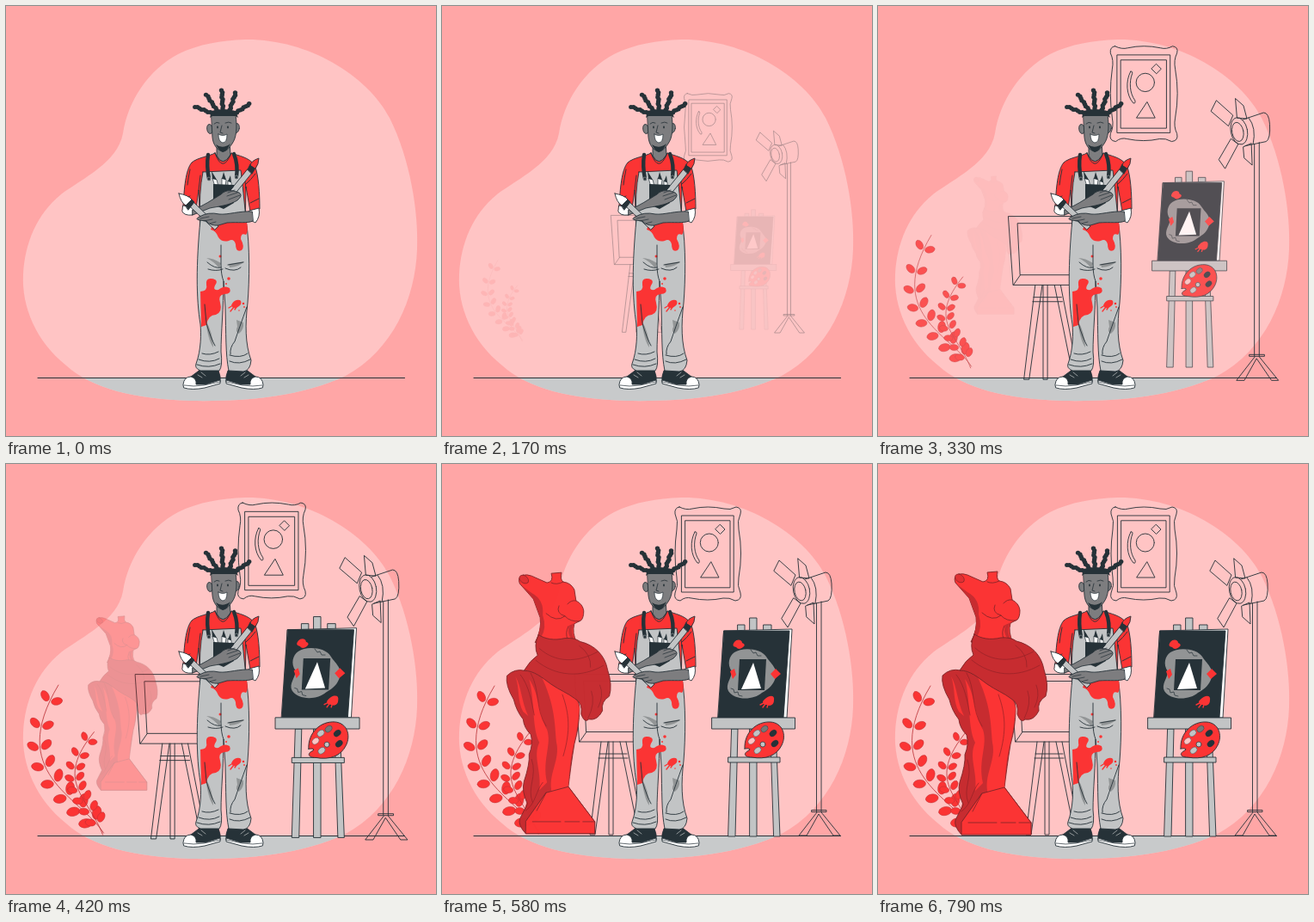
An HTML page with a canvas that plays this animation: 500 by 500 pixels, repeating every 830 ms.

```html
<!DOCTYPE html>
<html lang="en">
<head>
<meta charset="utf-8">
<title>Artist in the studio</title>
<style>
html, body { margin: 0; width: 100%; height: 100%; overflow: hidden; background: #ffa6a6; }
canvas { display: block; width: 100vw; height: 100vh; }
</style>
</head>
<body>
<canvas id="stage"></canvas>
<script>
const SIZE = 500, LOOP = 830, STEPS = 20, ZOOM_STEPS = 11;
const INK = '#263238', RED = '#fb3434', DEEP = '#c72c30', GREY = '#c2c4c5', SKIN = '#7d7d7f', WHITE = '#fff';
const ratio = Math.max(1, window.devicePixelRatio || 1);

function makeCanvas(canvas) {
  canvas.width = canvas.height = SIZE * ratio;
  const context = canvas.getContext('2d');
  context.lineCap = context.lineJoin = 'round';
  return context;
}

const stage = makeCanvas(document.getElementById('stage'));
const layer = makeCanvas(document.createElement('canvas'));
let ctx = stage;

function shape(d, fill, stroke = INK, width = 0.9) {
  const path = new Path2D(d);
  if (fill) { ctx.fillStyle = fill; ctx.fill(path); }
  if (stroke) { ctx.strokeStyle = stroke; ctx.lineWidth = width; ctx.stroke(path); }
}
const line = (d, width, color) => shape(d, null, color, width);
const flat = (d, fill) => shape(d, fill, null);

function oval(x, y, rx, ry, turn, fill, stroke, width = 0.9) {
  ctx.beginPath();
  ctx.ellipse(x, y, rx, ry, turn, 0, Math.PI * 2);
  if (fill) { ctx.fillStyle = fill; ctx.fill(); }
  if (stroke) { ctx.strokeStyle = stroke; ctx.lineWidth = width; ctx.stroke(); }
}

// Easing curve (.36, -.01, .5, 1.38): a quick rise with a small overshoot.
function ease(x) {
  if (x <= 0) return 0;
  if (x >= 1) return 1;
  const curve = (s, a, b) => 3 * s * (1 - s) ** 2 * a + 3 * s * s * (1 - s) * b + s ** 3;
  let low = 0, high = 1;
  for (let i = 0; i < 30; i++) {
    const mid = (low + high) / 2;
    if (curve(mid, 0.36, 0.5) < x) low = mid; else high = mid;
  }
  return curve(low, -0.01, 1.38);
}

function drawBackdrop() {
  ctx.fillStyle = '#ffa6a6';
  ctx.fillRect(0, 0, SIZE, SIZE);
  const blob = 'M278 39C350 38 420 80 446 130C470 178 480 240 478 283C476 340 450 400 395 430' +
    'C340 456 270 460 215 459C150 457 100 445 70 418C35 390 18 350 20 312C22 275 36 242 64 219' +
    'C88 201 130 182 136 148C142 110 165 75 200 56C225 44 250 40 278 39Z';
  flat(blob, '#ffc4c4');
  ctx.save();
  ctx.clip(new Path2D(blob));
  ctx.fillStyle = '#c8cacb';
  ctx.fillRect(0, 432, SIZE, 68);
  ctx.restore();
  line('M37 432.5H463.5', 1.1);
}

function drawPicture() {
  line('M276 50Q284 54 291 52Q309 48 328 52Q335 54 342 50Q349 51 347 58Q343 66 345 76Q350 104 345 132' +
    'Q343 142 347 150Q349 158 341 159Q334 155 327 156Q309 160 290 156Q283 154 277 159Q269 158 271 150' +
    'Q275 142 273 132Q269 104 273 76Q275 66 271 58Q270 51 276 50Z');
  line('M278.8 60H339.2V149H278.8ZM283 65.8H335V143.8H283Z');
  line('M294 79C288 90 289 106 297 115Q300 116 299 112C293 104 292 91 296 81Q296 78 294 79Z');
  oval(310.8, 91.5, 10.5, 10.5, 0, null, INK);
  line('M323.5 70.5L329 76L323.5 81.5L318 76ZM313 114L322 132H301Z');
}

function drawStand() {
  line('M154.5 244.5H260V323H160ZM165 252.5H260V311.5H168ZM160 323L168 311.5');
  line('M185 323L172 431H178L193 323M194 323V431H199V323M207 323L229 431H235L214 323');
  line('M183 337H215M182 342H216');
}

function drawLamp() {
  line('M435.5 162V404M441 160V404M430 404.5H447V402.5H430Z');
  line('M436 405L415 432H424L438 407L455 432H463L441 405');
  line('M422 134L446 126Q452 126 453 139Q454 156 449 159L425 164');
  line('M429 132Q438 143 434 162');
  oval(418, 147, 9.5, 15.5, -0.2, null, INK);
  oval(416.5, 148, 6.5, 11, -0.2, null, INK);
  line('M386 124L392 112L411 129L406 141ZM414 110L423 118L427 133L416 132ZM409 156L417 162L402 190L395 180ZM423 165L432 161L433 186L424 178Z');
}

function drawEasel() {
  shape('M344 187H352V195H344ZM358 179H366V196H358ZM374 187H383V195H374Z', GREY);
  shape('M337 308H344L341 433H333ZM358 308H366V433H358ZM382 308H388L393 433H386Z', GREY);
  shape('M328 194L407 192L401 295H322Z', WHITE);
  shape('M328 194H404L397 295H321Z', INK);
  flat('M340 219C350 212 372 215 377 224C382 232 391 238 388 248C385 257 381 261 372 266C362 275 340 275 333 264C329 256 337 249 337 241C331 233 334 223 340 219Z', '#929495');
  line('M359 216l3 4 3-1 2 4 4 0M336 261l3 1 1 4 4-1 1 4 4 1', 0.7);
  flat('M346 227H377L375 263H344Z', INK);
  flat('M362 231L371 261L348 262Z', WHITE);
  flat('M340 207C343 203 349 204 349 208Q354 210 350 213Q345 217 342 213Q336 212 340 207ZM335 241L340 238L342 245L338 250ZM388 238L394 244L387 250L382 244Z', RED);
  flat('M373 276Q377 271 381 270Q387 269 386 275Q386 280 381 281L377 280Q373 280 373 276Z', RED);
  line('M374 278L370 280M376 279L373 283M379 280L378 283', 1.4, RED);
  shape('M314 295H410.5V308H314Z', GREY);
  shape('M333 341H393V347H333Z', GREY);
  shape('M352 331C351 312 366 299 382 300C396 301 401 315 395 327C389 339 377 344 360 341C351 341 350 336 357 333Q360 330 352 331Z', RED);
  oval(373, 326, 3, 3, 0, GREY, INK, 0.7);
  for (const [x, y, color] of [[360, 322, '#ffc4c4'], [366, 313, GREY], [375, 308, '#777'], [385, 313, INK], [387, 325, INK], [367, 333, GREY]])
    oval(x, y, 4.5, 3.3, -0.7, color, INK, 0.4);
}

function drawBranch([a, b, c, d], pairs, size) {
  const vein = '#b93035';
  line(`M${a}C${b} ${c} ${d}`, 0.8, vein);
  const at = (t, i) => (1 - t) ** 3 * a[i] + 3 * t * (1 - t) ** 2 * b[i] + 3 * t * t * (1 - t) * c[i] + t ** 3 * d[i];
  for (let n = 0; n < pairs; n++) {
    const t = 0.1 + 0.83 * n / (pairs - 1);
    const heading = Math.atan2(at(t + 0.01, 1) - at(t, 1), at(t + 0.01, 0) - at(t, 0));
    const grow = size * (1 - 0.2 * t);
    for (const side of [-1, 1]) {
      const angle = heading + side * 0.95;
      const x = at(t, 0) + Math.cos(angle) * grow * 1.4;
      const y = at(t, 1) + Math.sin(angle) * grow * 1.4;
      oval(x, y, grow, grow * 0.66, angle, RED, vein, 0.5);
    }
  }
}

function drawPlants() {
  drawBranch([[113, 428], [85, 385], [0, 360], [61, 258]], 8, 8);
  drawBranch([[112, 430], [95, 385], [55, 370], [102, 312]], 8, 6.2);
}

function drawStatue() {
  const edge = '#7c2428';
  shape('M112 222C128 240 160 262 160 284C160 298 158 312 154 326C151 344 149 360 147 376L178 417V431H97Q88 421 90 414L99 396Q92 381 95 370Q102 349 101 338Q106 326 103 315Q95 307 94 297Q86 287 83 274Q73 257 75 246Q84 237 96 240Z', DEEP, edge);
  flat('M114 244C136 254 158 267 160 284C159 298 157 312 153 328C149 345 148 362 147 376L128 384C122 362 138 345 133 324C131 304 132 280 114 244Z', RED);
  flat('M101 250C113 267 112 291 122 309C128 327 116 344 122 371L113 380C116 357 105 341 113 324C104 306 108 275 101 250ZM85 247C92 258 92 277 100 293L94 288C87 276 90 260 85 247Z', RED);
  line('M91 245C101 258 104 276 107 292M103 243C114 262 108 286 121 305M104 344C111 364 98 377 105 394M97 404C109 396 109 380 117 371M140 268C148 290 150 310 141 340', 0.7, '#922126');
  shape('M94 128Q99 127 104 129L122 137Q130 136 127 126L139 125Q137 133 141 136Q150 137 154 145L156 158Q164 162 165 170Q165 178 162 181L154 185Q151 196 157 207Q135 210 108 207Q116 192 114 178L106 156L90 138Q87 130 94 128Z', RED, edge);
  oval(95, 133, 6, 4.2, 0.65, '#df3033', edge, 0.7);
  flat('M92 140L104 149Q119 157 117 175Q122 190 115 201L109 206Q116 188 114 177L106 156ZM155 184Q149 190 153 201L157 207Q144 201 148 187Z', DEEP);
  line('M127 137Q133 140 141 136M121 173Q133 184 143 176Q149 183 160 182M146 162Q150 157 156 158M136 164Q132 173 143 176M147 188Q143 196 146 203', 0.8, edge);
  shape('M112 198C120 203 130 205 143 202Q154 201 161 206C178 210 190 222 193 239Q199 257 195 270Q185 276 187 287Q181 299 171 297Q166 302 162 291Q164 278 155 273C146 266 137 263 127 256C116 248 107 240 95 240Q102 228 111 222Q106 211 112 198Z', DEEP, edge);
  line('M113 214C132 231 157 231 181 218M109 228C132 247 162 249 188 234M174 264Q179 278 170 296M184 257Q189 269 182 283M160 211Q174 221 173 236', 0.7, '#942227');
  shape('M121 383L147 376L178 417V431H97V417Z', RED, edge);
  line('M105 417H138M143 417H160M164 417H178M121 383L110 404', 0.8, edge);
}

function dread(x0, y0, x1, y1) {
  const length = Math.hypot(x1 - x0, y1 - y0);
  for (let i = 0; i <= 8; i++) {
    const t = i / 8, wave = Math.sin(i * 2.1) * 0.6;
    oval(x0 + (x1 - x0) * t - (y1 - y0) / length * wave,
      y0 + (y1 - y0) * t + (x1 - x0) / length * wave, 2.7, 2.5, 0, INK);
  }
}

function drawHead() {
  shape('M245 160V174Q252 188 261 173L260 158Z', SKIN);
  oval(237, 143, 3.3, 5.5, -0.15, SKIN, INK);
  oval(268, 142, 3.3, 5.5, 0.15, SKIN, INK);
  shape('M239 126H267C269 142 268 153 263 160C259 166 256 169 252 169C246 168 241 162 240 153Z', SKIN);
  flat('M237 130L239 122Q252 118 267 122L270 130L267 128H240Z', INK);
  for (const [x0, y0, x1, y1] of [[240, 125, 220, 117], [245, 121, 233, 103], [252, 119, 251, 98], [260, 121, 267, 101], [266, 125, 283, 114]])
    dread(x0, y0, x1, y1);
  flat('M244 161Q252 167 261 160Q257 169 252 170Q248 169 244 161Z', INK);
  shape('M247 149Q252 152 257 149Q257 159 252 159Q247 158 247 149Z', WHITE, INK, 0.7);
  line('M242 137Q245 134 248 136M255 136Q259 134 262 136M251 139L249 147L252 148', 0.8);
  oval(246, 141, 0.9, 1.4, 0, INK);
  oval(258, 141, 0.9, 1.4, 0, INK);
}

function drawShoe(x, flip) {
  ctx.save();
  ctx.translate(x, 0);
  ctx.scale(flip, 1);
  shape('M2 439Q0 433 9 431L21 422Q33 419 41 424Q44 431 43 437L22 441Z', INK);
  shape('M0 440Q1 431 9 431Q16 433 15 440L26 440L43 435V439L25 444Q10 447 1 444Z', WHITE);
  line('M1 441Q12 443 24 441L43 437', 0.7);
  line('M17 429L22 432M21 426L26 430', 0.7, GREY);
  ctx.restore();
}

function drawTrousers() {
  shape('M229 193L273 191Q276 215 279 248C284 280 283 320 281 345C278 370 278 393 285 412Q284 424 276 425L259 424C255 405 256 380 255 350L253 320C253 350 250 380 250 402Q252 419 248 424L226 424Q219 421 221 416C227 400 227 380 226 370C221 340 221 300 226 248Q224 218 229 193Z', GREY);
  flat('M233 293Q241 293 250 299L248 305Q242 297 233 293ZM259 300L277 297Q272 303 260 304ZM268 365L276 368Q277 376 271 381Q266 378 269 373ZM232 365Q241 381 241 397Q235 389 232 365Z', '#929596');
  flat('M241 252H280Q282 262 279 266Q273 263 273 271Q278 280 274 284Q267 287 267 277Q265 270 259 273Q251 275 247 269Q244 261 238 260Z', RED);
  flat('M226 332Q235 331 233 324Q232 316 239 317Q248 318 243 325Q240 331 247 330Q254 324 260 328Q263 335 254 335Q246 336 249 345Q252 356 244 359Q235 359 233 371L227 373Z', RED);
  flat('M262 348Q264 343 268 342Q275 341 273 347Q269 352 264 351Z', RED);
  line('M264 348L259 351M265 350L261 355M268 350L266 353', 1.4, RED);
  for (const [x, y, r] of [[249, 291, 1.5], [259, 317, 1.8], [256, 323, 1], [276, 346, 1.3], [277, 350, 0.9], [271, 354, 0.8]]) oval(x, y, r, r, 0, RED);
  line('M250 278V300Q250 313 253 320M234 298Q243 306 250 304M235 306Q244 309 252 306M258 301L276 298M255 305Q266 310 273 304M231 347L233 369Q238 386 243 395M280 350Q271 375 266 390Q260 397 261 405M228 404Q237 407 247 402M224 411Q237 416 248 410M222 417Q236 422 249 416M260 406Q273 410 281 404M260 413Q271 418 284 411');
}

function drawArtist() {
  drawShoe(206, 1);
  drawShoe(299, -1);
  shape('M243 171Q252 190 262 171C270 174 283 176 289 185C294 196 295 220 295 236L284 239L279 210L278 262H226L224 214L221 236L206 234C207 212 209 190 216 182C223 176 236 175 243 171Z', RED);
  drawHead();
  line('M243 171Q252 196 262 171');
  line('M214 190Q212 199 211 208M224 214L226 197M279 212L277 196M290 195Q285 202 279 207M208 225L214 221M294 224L284 229');
  drawTrousers();
  line('M235 173Q233 186 236 201M265 172Q270 184 268 199', 4.4);
  oval(236, 201, 2, 2, 0, INK, GREY, 0.5);
  oval(268, 199, 2, 2, 0, INK, GREY, 0.5);
  shape('M243 210L240 200L245 202L247 210ZM251 210L251 200L256 202L255 210ZM258 210L258 203L262 205L262 210Z', WHITE, INK, 0.7);
  flat('M240 201L239 192L245 202ZM251 201L253 193L256 202ZM258 204L261 197L262 205Z', INK);
  flat('M241 207L265 208V229L253 236L241 231Z', INK);
  shape('M206 232L221 235L217 243Q207 244 205 239Z', WHITE);
  shape('M283 238L294 235Q296 245 290 252L282 248Z', WHITE);
  // Raised brush
  shape('M281 190L286 194L261 225L256 221Z', GREY);
  shape('M281 190L284 184L291 187L286 195Z', INK);
  shape('M284 185Q285 180 294 177Q294 184 290 189Z', RED);
  shape('M217 237C229 233 240 225 250 219C256 213 263 214 271 217Q276 220 269 226C259 232 247 233 237 235L217 243Z', SKIN);
  line('M257 221L269 217M259 225L272 220M258 217L266 214', 0.7);
  // Lowered brush
  shape('M212 231L216 226L247 256L243 260Z', GREY);
  shape('M208 231L214 223L219 228L212 237Z', INK);
  shape('M201 218Q212 220 216 225L209 232Q203 228 201 218Z', WHITE);
  shape('M286 239C272 238 258 243 248 242Q235 239 225 245Q219 248 225 249L233 250Q238 256 247 255L257 252C270 251 281 253 287 250Z', SKIN);
  line('M226 247L236 245M230 250L240 248M237 253L244 251', 0.7);
}

function drawStudio() {
  drawPicture();
  drawStand();
  drawLamp();
}

// delay is counted in animation steps; (x, y) is the centre of the zoom
const groups = [
  { draw: drawStudio, x: 310, y: 240.5, delay: 0 },
  { draw: drawPlants, x: 70, y: 341, delay: 2.2 },
  { draw: drawEasel, x: 362.5, y: 307, delay: 2.2 },
  { draw: drawStatue, x: 136, y: 278, delay: 6.7 }
];

function drawGroup({ draw, x, y, delay }, step) {
  const progress = ease((step - delay) / ZOOM_STEPS);
  if (progress <= 0) return;
  const scale = 0.5 + 0.5 * progress;
  layer.setTransform(ratio, 0, 0, ratio, 0, 0);
  layer.clearRect(0, 0, SIZE, SIZE);
  layer.translate(x, y);
  layer.scale(scale, scale);
  layer.translate(-x, -y);
  ctx = layer;
  draw();
  ctx = stage;
  stage.globalAlpha = Math.min(1, progress);
  stage.drawImage(layer.canvas, 0, 0, SIZE, SIZE);
  stage.globalAlpha = 1;
}

function render(step) {
  stage.setTransform(ratio, 0, 0, ratio, 0, 0);
  drawBackdrop();
  for (const group of groups) drawGroup(group, step);
  drawArtist();
}

function stepAt(time) {
  let step = STEPS - 1;
  while (step > 0 && Math.round(step * 25 / 6) * 10 > time) step--;
  return step;
}

const start = performance.now();
let shown = -1;
function tick() {
  const step = stepAt((performance.now() - start) % LOOP);
  if (step !== shown) render(shown = step);
  requestAnimationFrame(tick);
}
tick();
</script>
</body>
</html>
```
